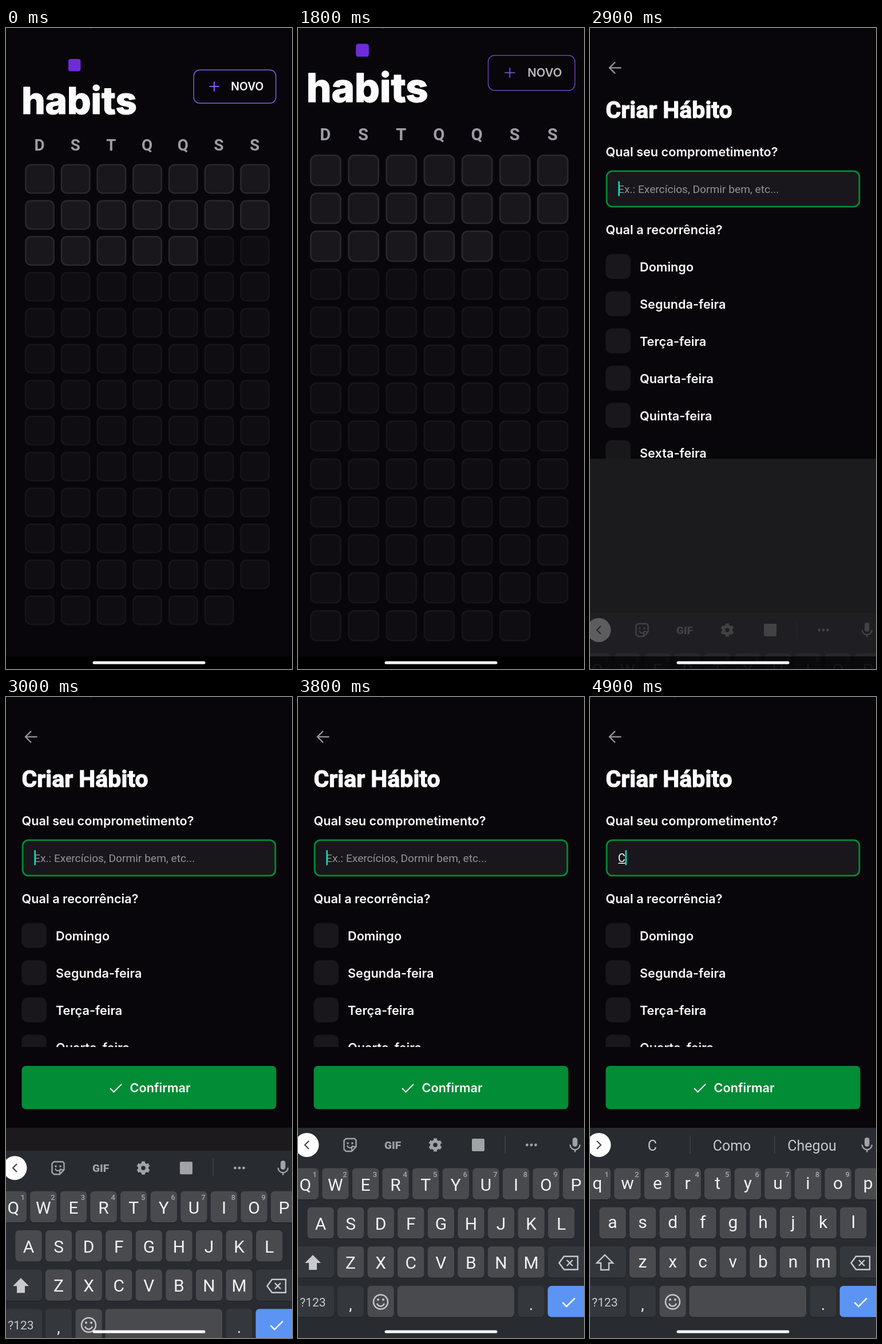
Write an HTML page with a canvas that moves like this. It is 500 px wide and 1119 px high and loops after 5000 ms.

```html
<!DOCTYPE html>
<html lang="pt">
<head>
<meta charset="utf-8">
<style>
html, body { margin: 0; width: 100%; height: 100%; overflow: hidden; background: #08060b; }
canvas { display: block; width: 500px; height: 1119px; }
</style>
</head>
<body>
<canvas id="stage"></canvas>
<script>
const W = 500, H = 1119, LOOP = 5000, STEP = 100;
const canvas = document.getElementById('stage');
const ctx = canvas.getContext('2d');
const dpr = window.devicePixelRatio || 1;
canvas.width = W * dpr;
canvas.height = H * dpr;

const BG = '#08060b', SURFACE = '#19171b', EDGE = '#29272c', GREEN = '#028c36';
const VIOLET = '#8b5cf6', WHITE = '#fcfcfd', ICON = '#a1a3a7';
const KEY = '#484a4e', KEY_DARK = '#34373c', BOARD = '#282b30', PANEL = '#1c1a1d';
const inter = (weight, size) => `${weight} ${size}px Inter, sans-serif`;
const roboto = (weight, size) => `${weight} ${size}px Roboto, sans-serif`;
const clamp = v => Math.max(0, Math.min(1, v));

function box(x, y, w, h, r, fill, stroke, width = 0) {
  ctx.beginPath();
  ctx.roundRect(x + width / 2, y + width / 2, w - width, h - width, r);
  if (fill) { ctx.fillStyle = fill; ctx.fill(); }
  if (stroke) { ctx.strokeStyle = stroke; ctx.lineWidth = width; ctx.stroke(); }
}

function text(str, x, y, font, color, align = 'left') {
  ctx.font = font;
  ctx.fillStyle = color;
  ctx.textAlign = align;
  ctx.fillText(str, x, y);
}

function heading(str, x, y, font) {
  text(str, x, y, font, WHITE);
  ctx.strokeStyle = WHITE;
  ctx.lineWidth = 1.2;
  ctx.lineJoin = 'round';
  ctx.strokeText(str, x, y);
  ctx.lineJoin = 'miter';
}

function trace(points, closed) {
  ctx.beginPath();
  points.forEach(([x, y]) => ctx.lineTo(x, y));
  if (closed) ctx.closePath();
}

function line(points, color, width, closed = false) {
  trace(points, closed);
  ctx.strokeStyle = color;
  ctx.lineWidth = width;
  ctx.stroke();
}

function disc(x, y, r, color) {
  ctx.beginPath();
  ctx.arc(x, y, r, 0, Math.PI * 2);
  ctx.fillStyle = color;
  ctx.fill();
}

function arc(x, y, r, from, to, color, width) {
  ctx.beginPath();
  ctx.arc(x, y, r, from, to);
  ctx.strokeStyle = color;
  ctx.lineWidth = width;
  ctx.stroke();
}

function layer(alpha, draw) {
  ctx.save();
  ctx.globalAlpha *= alpha;
  draw();
  ctx.restore();
}

function zoomed(scale, draw) {
  ctx.save();
  ctx.translate(250, 533);
  ctx.scale(scale, scale);
  ctx.translate(-250, -533);
  draw();
  ctx.restore();
}

function homeScreen(buttonAlpha) {
  ctx.fillStyle = BG;
  ctx.fillRect(0, 0, W, H);
  box(109, 54, 21.5, 21.5, 4, '#6d2bd9');
  heading('habits', 27.2, 150, inter(800, 65.2));

  layer(buttonAlpha, () => {
    box(327.5, 72.5, 145, 59.5, 10.5, null, VIOLET, 1.4);
    line([[355.5, 102], [372.5, 102]], VIOLET, 2);
    line([[364, 93.5], [364, 110.5]], VIOLET, 2);
    text('NOVO', 393.3, 109, inter(600, 19.4), WHITE);
  });

  const pitch = 62.7, days = 90, past = 19;
  [...'DSTQQSS'].forEach((d, i) =>
    text(d, 58.5 + i * pitch, 213.5, roboto(700, 27.8), '#9d9da4', 'center'));
  for (let i = 0; i < days; i++) {
    const x = 33 + (i % 7) * pitch, y = 237.5 + Math.floor(i / 7) * 62.75;
    layer(i < past ? 1 : 0.4, () => box(x, y, 52, 52, 9.5, SURFACE, EDGE, 2.6));
  }
}

function inputField(t) {
  const focused = t >= 2800, typed = t >= 4700;
  box(27.7, 248.5, 444.6, 64.8, 10, SURFACE, focused ? GREEN : EDGE, 2.8);
  if (typed) {
    text('C', 49, 288, roboto(400, 19.4), WHITE);
    box(49.5, 289.5, 12.5, 1.5, 0, WHITE);
  } else {
    text('Ex.: Exercícios, Dormir bem, etc...', 49, 288, roboto(400, 19.2), '#939297');
  }
  const blinkStart = typed ? 4700 : 2800;
  const caretOn = focused && Math.floor((t - blinkStart) / 500) % 2 === 0;
  if (caretOn) box(typed ? 61.5 : 49.3, 267.5, 2.7, 26, 0, '#12d6b8');
}

function formScreen(t) {
  const resized = t >= 3000;
  ctx.fillStyle = BG;
  ctx.fillRect(0, 0, W, H);

  ctx.save();
  ctx.beginPath();
  ctx.rect(0, 0, W, resized ? 611 : H);
  ctx.clip();
  line([[54.5, 69.5], [34, 69.5]], '#98979d', 2.3);
  line([[44, 59.5], [34, 69.5], [44, 79.5]], '#98979d', 2.3);
  heading('Criar Hábito', 27.5, 156.5, roboto(700, 41));

  const label = inter(600, 21.7);
  text('Qual seu comprometimento?', 27.5, 224, label, WHITE);
  inputField(t);
  text('Qual a recorrência?', 27.5, 359.5, label, WHITE);
  ['Domingo', 'Segunda-feira', 'Terça-feira', 'Quarta-feira', 'Quinta-feira', 'Sexta-feira', 'Sábado']
    .forEach((day, i) => {
      const y = 394.5 + i * 65;
      box(27.5, y, 43.5, 43.5, 10.5, SURFACE);
      text(day, 87, y + 30, label, WHITE);
    });
  ctx.restore();

  const y = resized ? 644 : 989;
  box(27.5, y, 445, 75.5, 7, GREEN);
  line([[182, y + 39], [188.5, y + 45.5], [202, y + 32]], WHITE, 2);
  text('Confirmar', 216.5, y + 46, label, WHITE);
}

function micIcon() {
  box(480, 769, 8.5, 16, 4.2, ICON);
  arc(484.3, 781.5, 8.6, 0, Math.PI, ICON, 2.4);
  line([[484.3, 790], [484.3, 794.5]], ICON, 2.6);
}

function toolIcons() {
  const rim = [[84, 771], [99, 771], [101.5, 773.5], [101.5, 785], [94, 793], [84, 793], [80.5, 790], [80.5, 774]];
  line(rim, ICON, 2.4, true);
  line([[101, 785], [94, 785], [94, 792]], ICON, 2);
  disc(87, 779, 1.8, ICON);
  disc(95, 779, 1.8, ICON);
  arc(91, 782, 5, 0.2, Math.PI - 0.2, ICON, 2);

  text('GIF', 165.5, 789, roboto(900, 19), ICON, 'center');

  arc(240, 782, 6.5, 0, Math.PI * 2, ICON, 5.5);
  for (let i = 0; i < 6; i++) {
    const a = Math.PI / 6 + i * Math.PI / 3, c = Math.cos(a), s = Math.sin(a);
    line([[240 + c * 8, 782 + s * 8], [240 + c * 11.5, 782 + s * 11.5]], ICON, 6);
  }

  box(304, 771, 22, 22, 2, ICON);
  box(361.5, 766, 1.2, 31, 0, '#45484c');
  [400.5, 408, 415.5].forEach(x => disc(x, 782, 2.4, ICON));
}

function suggestions() {
  [['C', 109], ['Como', 248], ['Chegou', 388]].forEach(([word, x]) =>
    text(word, x, 791.5, roboto(400, 25), '#c6c8cb', 'center'));
  [174.5, 322].forEach(x => box(x, 766, 1.2, 31, 0, '#45484c'));
}

function key(x, y, w, color = KEY) {
  box(x, y + 1.2, w, 54.5, 6.5, '#1f2125');
  box(x, y, w, 54.5, 6.5, color);
}

function keyboard(t) {
  const lower = t >= 4700, suggesting = t >= 4800;
  const pitch = 52.6, keyW = 46.4, ink = '#f1f2f3';
  ctx.fillStyle = BOARD;
  ctx.fillRect(0, 752, W, H);

  disc(15.5, 782, 21, '#ffffff');
  const tip = suggesting ? 19 : 12, back = suggesting ? 12 : 19;
  line([[back, 775], [tip, 782], [back, 789]], '#4d5055', 2.3);
  if (suggesting) suggestions(); else toolIcons();
  micIcon();

  [['QWERTYUIOP', -10.4, 822.5], ['ASDFGHJKL', 16.3, 890.8], ['ZXCVBNM', 68.8, 959.2]]
    .forEach(([letters, left, y], row) => [...letters].forEach((letter, i) => {
      const x = left + i * pitch;
      key(x, y, keyW, t === 4600 && letter === 'C' ? '#5c5f64' : KEY);
      text(lower ? letter.toLowerCase() : letter, x + keyW / 2, y + (lower ? 36.5 : 39),
        roboto(400, 30), ink, 'center');
      if (row === 0) text((i + 1) % 10, x + 39.7, y + 15, roboto(500, 13), '#a5a7ab', 'center');
    }));

  key(-10, 959.2, 73, KEY_DARK);
  const shift = [[26, 974], [40, 988], [33, 988], [33, 1000], [19, 1000], [19, 988], [12, 988]];
  if (lower) {
    line(shift, '#c8cacd', 2.4, true);
  } else {
    trace(shift, true);
    ctx.fillStyle = '#c8cacd';
    ctx.fill();
  }
  key(436.5, 959.2, 80, KEY_DARK);
  line([[456.5, 988], [465, 976.5], [489, 976.5], [489, 999.5], [465, 999.5]], '#c8cacd', 2.4, true);
  line([[470, 983], [480, 993]], '#c8cacd', 2.4);
  line([[480, 983], [470, 993]], '#c8cacd', 2.4);

  const y = 1028;
  key(-10, y, 73, KEY_DARK);
  text('?123', 26, y + 35.5, roboto(400, 21), '#c8cacd', 'center');
  key(68.8, y, keyW, KEY_DARK);
  text(',', 92, y + 42, roboto(400, 27), ink, 'center');
  key(121.4, y, keyW);
  arc(144.5, 1056, 12.5, 0, Math.PI * 2, '#c8cacd', 2.4);
  disc(140, 1052, 2, '#c8cacd');
  disc(149, 1052, 2, '#c8cacd');
  arc(144.5, 1057, 6.5, 0.25, Math.PI - 0.25, '#c8cacd', 2.4);
  key(173.5, y, 204.5);
  key(384.4, y, keyW, KEY_DARK);
  text('.', 407.5, y + 42, roboto(400, 27), ink, 'center');
  key(436.5, y, 80, '#5b94f3');
  line([[462.5, 1057], [469.5, 1064], [484, 1049.5]], '#ffffff', 2.5);
}

// The board slides up over a plain panel that fades away in front of it
function keyboardArea(t) {
  const panel = () => box(0, 752, W, H - 752, 0, PANEL);
  const offset = t < 3300 ? 269 * Math.exp(-(t - 2900) / 52.6) : 0;
  panel();
  ctx.save();
  ctx.translate(0, offset);
  keyboard(t);
  ctx.restore();
  layer(1 - clamp((t - 2865) / 120), panel);
}

function render(t) {
  ctx.setTransform(dpr, 0, 0, dpr, 0, 0);
  ctx.fillStyle = BG;
  ctx.fillRect(0, 0, W, H);

  const open = t < 1730 ? 0 : 1 - Math.exp(-Math.pow((t - 1730) / 103, 2));
  const formAlpha = clamp((t - 1800) / 50);
  const pressed = 1 - 0.27 * clamp((t - 1450) / 150);
  if (t < 2100) zoomed(1 + 0.15 * open, () => homeScreen(pressed));
  if (formAlpha > 0) layer(formAlpha, () => zoomed(t < 2100 ? 0.85 + 0.15 * open : 1, () => formScreen(t)));

  if (t >= 2900) keyboardArea(t);
  if (t < 3000) layer(t < 2900 ? 1 : 0.75, () => box(0, 1097, W, 22, 0, '#010102'));

  box(146, -2, 4, 3, 1, '#26242a');
  box(151.5, 1105.5, 197, 5, 2.5, '#ffffff');
}

function tick(now) {
  render(Math.floor((now % LOOP) / STEP) * STEP);
  requestAnimationFrame(tick);
}
requestAnimationFrame(tick);
</script>
</body>
</html>
```
